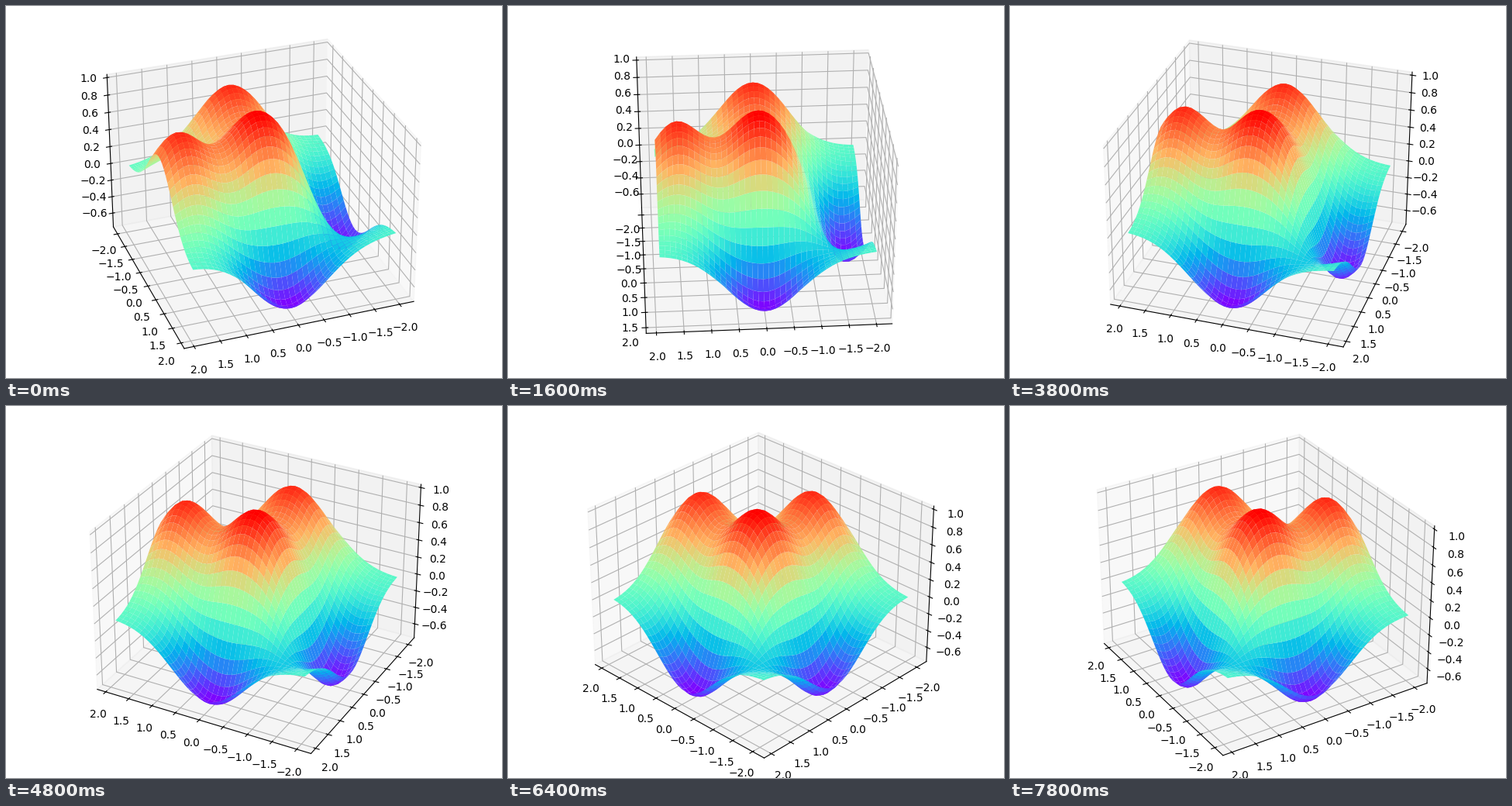
A matplotlib script for the animation above (8 s loop, 640 px wide and 480 px high).

```python
import numpy as np
import matplotlib.pyplot as plt
from matplotlib.animation import FuncAnimation
from matplotlib.ticker import MultipleLocator

FRAMES, INTERVAL = 40, 200
START_AZIM, STEP = 70, 2


def padded(values, margin):
    """Data limits with a relative margin, plus 1/48 of the range per side."""
    lo, hi = values.min(), values.max()
    pad = (hi - lo) * margin
    lo, hi = lo - pad, hi + pad
    edge = (hi - lo) / 48
    return lo - edge, hi + edge


fig = plt.figure(figsize=(6.4, 4.8), dpi=100)
ax = fig.add_axes([0, 0, 1, 1], projection="3d")

axis = np.arange(-2, 2, 0.1)
x, y = np.meshgrid(axis, axis)
z = (1 - y**5 + x**5) * np.exp(-x**2 - y**2)
ax.plot_surface(x, y, z, rstride=1, cstride=1, cmap="rainbow")

ax.set_xlim(*padded(x, 0.05))
ax.set_ylim(*padded(y, 0.05))
ax.set_zlim(*padded(z, 0))
ax.xaxis.set_major_locator(MultipleLocator(0.5))
ax.yaxis.set_major_locator(MultipleLocator(0.5))
ax.zaxis.set_major_locator(MultipleLocator(0.2))


def rotate(i):
    ax.view_init(elev=30, azim=START_AZIM + STEP * i)
    return []


anim = FuncAnimation(fig, rotate, frames=FRAMES, init_func=lambda: rotate(0),
                     interval=INTERVAL, repeat=True, repeat_delay=0, blit=False)
plt.show()
```
